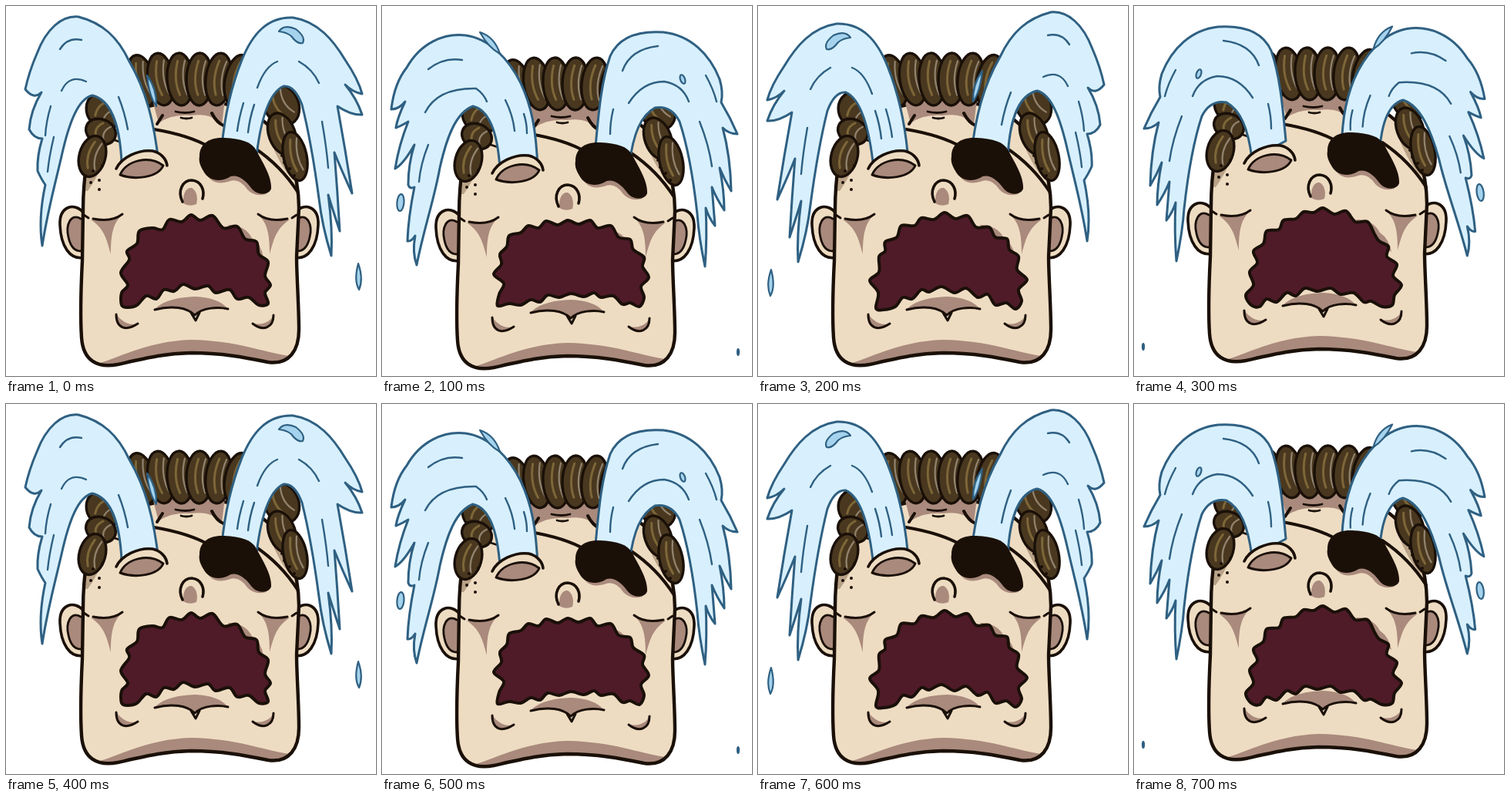
Write an HTML page that moves like this. It is 480 px wide and 480 px high and loops after 0.8 s.

```html
<!DOCTYPE html>
<html lang="en">
<head>
<meta charset="utf-8">
<title>Crying face</title>
<style>
html, body { margin: 0; width: 100%; height: 100%; overflow: hidden; background: #fff; }
svg { display: block; width: 100vw; height: 100vh; }
.line { fill: none; stroke: #1a1008; stroke-width: 3.6; stroke-linecap: round; stroke-linejoin: round; }
.skin { fill: #eedcc2; }
.shade { fill: #a98a7c; stroke: none; }
.ink { fill: #1a1008; }
.lock { fill: #49381f; stroke: #1a1008; stroke-width: 3.4; }
.shine { fill: none; stroke: #7d6638; stroke-width: 3; stroke-linecap: round; }
.pale { stroke: #91836f; stroke-width: 2.2; }
.water { fill: #d8f0fd; stroke: #2f6082; stroke-width: 3; stroke-linejoin: round; }
.ripple { fill: none; stroke: #2f6082; stroke-width: 2.4; stroke-linecap: round; }
.drop { fill: #a5d3ed; stroke: #2f6082; stroke-width: 2.2; stroke-linejoin: round; }
.mouth { fill: #4f1b28; stroke: #1a1008; stroke-width: 4; stroke-linejoin: round; }
</style>
</head>
<body>
<svg viewBox="0 0 480 480">
  <defs>
    <path id="skull" d="M105 200C102 220 100 245 100 265L99 330C97 370 96 400 98 430C100 460 118 470 145 465C185 456 205 451 240 450C280 450 310 456 340 462C368 466 380 446 380 420C380 390 377 350 377 325L380 262C380 235 375 215 368 195C345 150 320 125 240 122C160 125 115 160 105 200Z"/>
    <clipPath id="inHead"><use href="#skull"/></clipPath>
    <g id="ear">
      <path class="line skin" d="M101 268C88 254 69 260 70 284C71 310 82 331 103 326"/>
      <path class="shade" d="M98 276C84 268 77 284 81 300C84 316 92 319 99 318Z"/>
      <path class="line" style="stroke-width:2.8" d="M97 276C84 268 77 284 81 300C84 314 91 318 97 318"/>
    </g>
    <g id="cheek">
      <path class="shade" d="M110 277C126 280 140 277 151 270C139 282 136 295 136 322C130 300 127 289 110 277Z"/>
      <path class="line" style="stroke-width:3" d="M101 271l6 4M113 276C128 279 142 277 151 270"/>
    </g>
  </defs>

  <g class="low">
    <use href="#ear"/>
    <use href="#ear" transform="translate(475 0) scale(-1 1)"/>
    <use href="#skull" class="skin"/>
    <g clip-path="url(#inHead)">
      <path class="shade" d="M112 466C145 458 180 435 240 433C300 434 332 449 368 454L350 480H112Z"/>
      <path fill="#b9a287" d="M100 190L132 180Q126 212 106 240H98ZM345 180L385 190V235Q362 222 345 180Z"/>
    </g>
    <use href="#skull" class="line" style="stroke-width:4.4"/>
    <use href="#cheek"/>
    <use href="#cheek" transform="translate(478 0) scale(-1 1)"/>
    <path class="shade" d="M143 400C144 418 155 420 171 412C160 415 151 410 143 400ZM320 412C335 422 346 415 347 401C342 411 332 414 320 412Z"/>
    <path class="line" style="stroke-width:3" d="M143 400C143 419 156 422 171 412M320 412C334 423 347 417 347 401"/>
    <path class="shade" d="M193 393C206 381 224 378 245 377C266 378 280 383 288 393C270 390 255 391 246 400C236 391 214 389 193 393Z"/>
    <path class="line" style="stroke-width:3" d="M193 394C215 388 235 391 245 401C255 391 275 390 288 393M240 398l6 10l5 -10"/>
  </g>

  <g class="up">
    <path class="shade" d="M190 122H284L280 154Q266 138 240 142Q214 140 198 152Z"/>
    <g id="hair"></g>
    <g id="freckles" class="ink"></g>
    <path class="line" style="stroke-width:2.8" d="M220 137q13 3 24 0M227 145q7 2 14 0M141 174l9 3"/>
    <path class="line" style="stroke-width:4" d="M203 142L196 153M267 139Q273 151 282 155"/>
    <path class="line" style="stroke-width:4" d="M192 160C222 165 245 172 264 183M322 184C346 200 365 220 379 242"/>
  </g>

  <g id="tears"></g>

  <g class="up">
    <path class="skin" d="M143 211C150 196 172 186 190 188C200 190 208 198 209 207L200 224H150Z"/>
    <path class="line" d="M143 211C150 196 172 186 190 188C200 190 208 198 209 207"/>
    <path class="line" style="fill:#a98a7c;stroke-width:3" d="M148 219C156 200 186 193 204 207C197 223 167 226 148 219Z"/>
    <path class="shade" d="M258 214Q266 234 288 228Q302 222 313 238Q322 248 338 244L318 224L290 214Z"/>
    <path class="ink" d="M251 195C251 180 262 170 283 171C305 172 319 176 325 188C331 200 345 220 344 237C341 246 325 246 318 236C308 222 296 217 288 223C276 229 262 226 256 214C251 206 250 200 251 195Z"/>
    <path class="shade" d="M230 256C229 243 234 235 241 236C248 240 249 250 247 257Q238 261 230 256Z"/>
    <path class="line" d="M229 254C222 240 229 226 241 226C254 227 258 240 255 250"/>
    <path class="shade" d="M288 284Q310 284 319 301Q331 309 334 326L310 308Z"/>
  </g>

  <g id="mouths"></g>
</svg>
<script>
const $ = s => document.querySelector(s);
const path = (d, cls) => `<path class="${cls}" d="${d}"/>`;
const group = (body, move = '') => `<g transform="${move}">${body}</g>`;
const oval = (x, y, rx, ry, cls, turn = 0) =>
  `<ellipse class="${cls}" cx="${x}" cy="${y}" rx="${rx}" ry="${ry}" transform="rotate(${turn} ${x} ${y})"/>`;

// A curl of hair with two strands of light
function lock(x, y, rx, ry, turn) {
  const strand = (k, cls) =>
    path(`M${x + rx * k} ${y - ry * .7}Q${x + rx * (k - .45)} ${y} ${x + rx * k} ${y + ry * .6}`, cls);
  return oval(x, y, rx, ry, 'lock') .replace(/rotate\(0/, `rotate(${turn}`) +
    group(strand(-.1, 'shine') + strand(.45, 'shine pale'), `rotate(${turn} ${x} ${y})`);
}
let hair = '';
for (let i = 0; i < 6; i++) {
  const x = 176 + 25 * i;
  hair += lock(x, 95 + (i === 0 || i === 5 ? 2 : 0), 17, 34, -14 + 5 * i);
}
hair += lock(128, 135, 25, 23, 50) + lock(123, 163, 20, 16, 25) + lock(112, 195, 17, 27, 15)
  + lock(357, 128, 22, 28, -30) + lock(358, 166, 17, 28, -20) + lock(375, 195, 15, 32, -12);
$('#hair').innerHTML = hair;

$('#freckles').innerHTML =
  [[113, 214], [121, 226], [110, 229], [125, 207], [121, 238], [361, 203], [368, 211], [374, 220], [358, 194]]
    .map(([x, y]) => `<circle cx="${x}" cy="${y}" r="2"/>`).join('');

// Two jets for each eye: one tall and narrow, one round and wide
const tallLeft =
  path('M150 203C148 160 138 122 112 116C94 120 82 150 72 195C64 230 54 265 47 311C43 285 46 255 51 232Q46 225 41 214Q40 195 47 172Q36 172 30 160Q32 135 46 112Q36 122 25 108Q30 85 40 62C52 30 72 12 94 14C125 22 145 40 160 72C182 110 192 150 198 203Z', 'water') +
  path('M70 56Q80 40 98 44M72 110Q82 88 104 98M146 118Q154 138 158 160M58 130Q52 150 51 168M62 170Q56 195 54 215', 'ripple') +
  path('M183 90Q196 108 195 130Q186 118 183 90Z', 'drop');
const tallRight =
  path('M280 182C284 140 294 100 306 70C320 35 340 14 372 15C405 20 425 45 440 70Q457 95 462 114Q450 112 440 102Q455 120 462 141Q448 142 430 130Q440 185 449 243Q436 215 426 190Q430 240 433 292Q424 265 418 245Q424 290 422 324Q410 285 406 250C400 205 392 160 384 128C378 112 370 103 360 104C342 112 330 145 324 203Z', 'water') +
  path('M326 106Q336 78 352 72M380 72Q398 82 406 100M308 126Q302 146 300 162M322 128Q316 146 314 164M410 150Q416 185 418 210', 'ripple') +
  path('M354 33Q361 23 376 30Q389 40 385 48Q378 50 370 39Q364 34 354 33Z', 'drop') +
  path('M457 334Q464 354 458 368Q451 356 457 334Z', 'drop');
const wideLeft =
  path('M153 211C150 165 140 135 118 130C96 138 84 170 75 210C68 250 54 290 45 336Q39 320 43 298Q38 306 33 305Q34 275 42 235Q36 238 34 232Q34 205 42 180Q28 205 17 211Q22 180 34 150Q24 156 18 158Q20 145 30 124Q22 134 12 134Q16 100 32 80C50 48 80 35 108 38C140 42 165 70 180 100C194 130 200 160 202 211Z', 'water') +
  path('M56 138Q72 106 122 107Q132 114 136 124M60 82Q80 66 104 70M160 122Q170 142 172 162M60 180Q50 205 48 228M184 140Q188 152 188 165', 'ripple') +
  path('M127 34Q146 40 153 62Q138 54 127 34Z', 'drop') +
  oval(24, 255, 4.5, 11, 'drop', 5);
const wideRight =
  path('M277 182C281 140 284 100 296 65C308 38 335 32 365 34C400 38 425 62 438 95Q443 112 440 125Q452 145 461 166Q450 166 442 158Q452 195 453 240Q444 225 438 210Q444 240 444 265Q434 250 428 235Q430 260 432 285Q424 275 420 262Q422 300 419 338Q411 300 409 270C404 225 396 180 386 150C378 134 366 130 354 132C336 142 326 165 321 205Z', 'water') +
  path('M320 126Q338 98 366 98Q390 102 398 124M312 84Q322 56 358 52M300 134Q296 150 296 166M412 150Q424 180 428 208M420 90Q430 108 434 124', 'ripple') +
  oval(390, 95, 3, 6, 'drop', -20) + oval(462, 449, 1, 4, 'drop');

const flip = 'translate(474 0) scale(-1 1)';
const jets = [
  group(tallLeft) + group(tallRight),
  group(wideLeft) + group(wideRight),
  group(tallRight, `translate(0 8) ${flip}`) + group(tallLeft, `translate(0 -6) ${flip}`),
  group(wideRight, `translate(0 -7) ${flip}`) +
    group(wideLeft, `translate(-4 -6) rotate(-2.9 314 190) ${flip}`)
];

// Wavy rims, given as points and joined by a smooth closed curve
const rims = [
  '150,388 150,372 158,362 149,346 160,329 157,318 170,308 173,292 190,288 203,290 212,277 228,280 240,271 252,278 268,272 282,288 300,286 310,302 325,306 328,322 340,332 336,350 343,362 336,372 340,386 328,388 315,378 300,380 290,368 272,372 262,363 245,367 230,361 218,370 205,368 195,380 182,376 170,388 158,391',
  '150,389 152,374 158,360 145,348 155,335 153,322 162,312 165,298 180,294 190,285 203,288 213,279 228,284 241,278 255,283 270,278 280,288 297,285 307,300 322,303 326,316 340,326 338,338 346,352 336,364 340,378 334,390 322,385 312,387 300,376 284,378 275,372 262,377 245,373 230,378 215,375 205,384 193,381 180,388 165,386',
  '153,392 156,372 145,356 157,345 157,325 165,318 165,306 180,300 186,285 203,285 212,275 228,277 242,268 256,276 272,272 283,287 300,287 308,300 323,302 326,316 338,325 336,342 349,355 338,368 342,383 334,393 322,385 308,388 298,374 285,378 270,366 255,372 238,364 222,371 212,368 200,380 188,378 178,390 163,394',
  '152,388 145,375 155,362 150,345 160,333 155,318 168,308 172,292 188,290 194,278 210,276 220,267 233,268 245,262 260,270 275,266 287,280 303,280 312,296 318,305 330,312 328,325 341,335 336,350 347,362 338,375 335,388 322,390 308,383 298,384 285,372 268,374 255,366 238,370 222,366 210,376 198,372 185,384 172,380 163,390'
];
function smooth(text) {
  const p = text.split(' ').map(s => s.split(',').map(Number));
  const at = i => p[(i + p.length) % p.length];
  const lean = (a, b, c, k) => a.map((v, j) => v + (c[j] - b[j]) * k);
  return `M${p[0]}` + p.map((a, i) =>
    `C${lean(a, at(i - 1), at(i + 1), 1 / 6)} ${lean(at(i + 1), a, at(i + 2), -1 / 6)} ${at(i + 1)}`).join('') + 'Z';
}

$('#tears').innerHTML = jets.map(j => group(j)).join('');
$('#mouths').innerHTML = rims.map(r => group(path(smooth(r), 'mouth'))).join('');

const lift = { up: [0, 6, 0, -7], low: [0, 4, 0, -5] };
const posed = [...$('#tears').children].map((g, i) => [g, $('#mouths').children[i]]);
const bodies = Object.keys(lift).flatMap(k => [...document.querySelectorAll('.' + k)].map(g => [g, lift[k]]));

function draw(ms) {
  const pose = Math.floor(ms / 100) % 4;
  posed.forEach((pair, i) => pair.forEach(g => g.style.display = i === pose ? '' : 'none'));
  bodies.forEach(([g, dy]) => g.setAttribute('transform', `translate(0 ${dy[pose]})`));
}

const start = performance.now();
function tick() {
  draw(performance.now() - start);
  requestAnimationFrame(tick);
}
tick();
</script>
</body>
</html>
```
